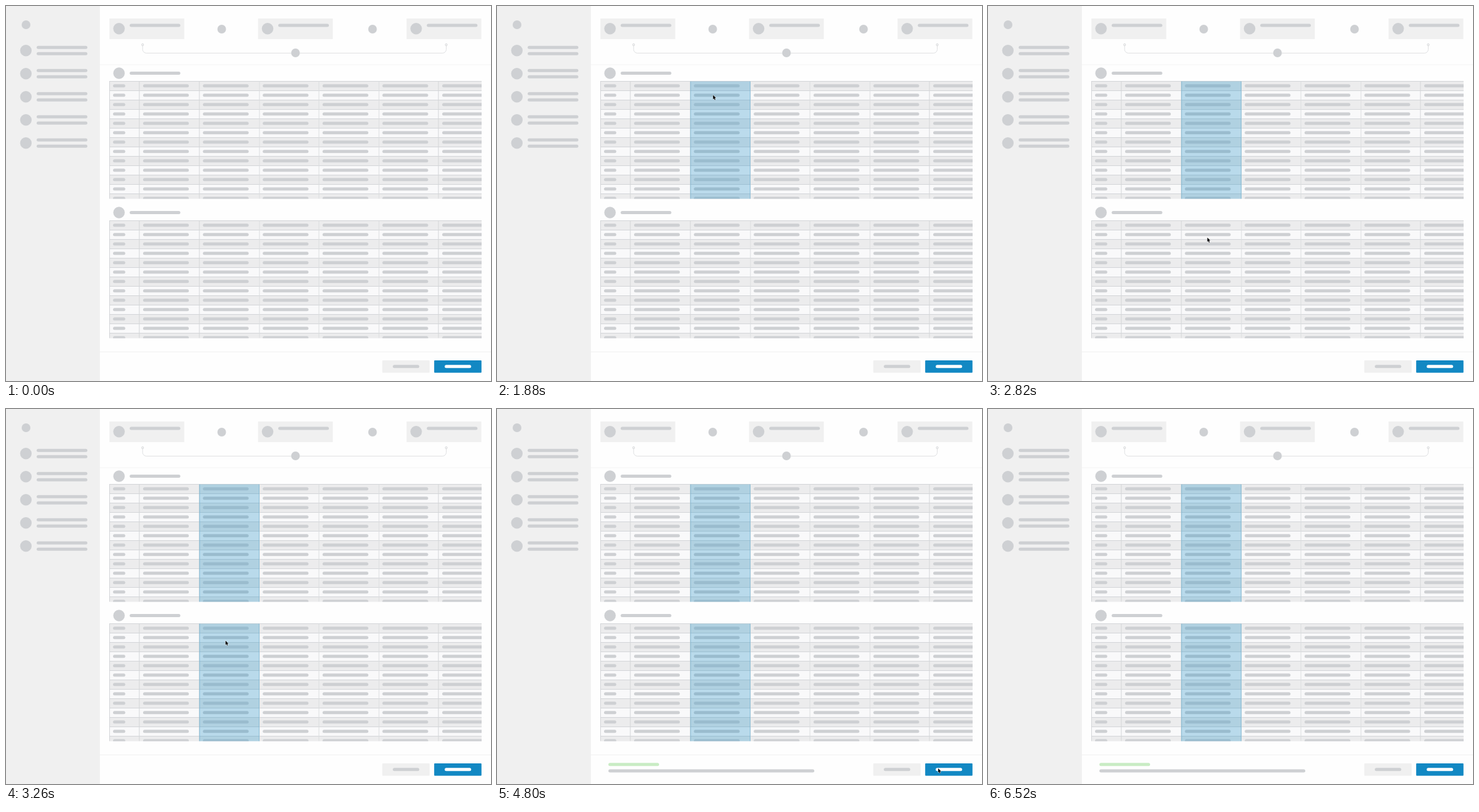
An HTML page with a canvas that plays this animation: 775x600 px, repeating every 6.54 s.

```html
<!DOCTYPE html>
<html lang="en">
<head>
<meta charset="utf-8">
<title>Column matching</title>
<style>
  html, body { margin: 0; width: 100%; height: 100%; overflow: hidden; background: #fefefe; }
  canvas { display: block; }
</style>
</head>
<body>
<canvas id="stage" width="775" height="600"></canvas>
<script>
const LOOP = 6540;
const GREY = '#ced0d3', PANEL = '#f0f0f0', LINE = '#d3d5d8', BLUE = '#1288c3';
const ctx = document.getElementById('stage').getContext('2d');

const TABLES = [120.5, 343.5];
const TABLE_HEIGHT = 188, ROW = 15, LEFT = 165, RIGHT = 760;
const COLUMN = 95.6, FIRST_COLUMN = 213.3;

const clamp = v => Math.max(0, Math.min(1, v));
const easeOut = p => 1 - (1 - p) ** 3;
const easeInOut = p => p < 0.5 ? 4 * p ** 3 : 1 - (2 - 2 * p) ** 3 / 2;
const easeIn = p => p * p;
const linear = p => p;

// Pointer stops: time, x, y, easing used to get there.
const POINTER = [
  [740, 800, 109, linear],
  [1000, 331, 152, easeOut],
  [1120, 338, 142, easeInOut],
  [1440, 345.3, 142.5, linear],
  [1980, 345.3, 142.5, linear],
  [2680, 350.5, 370.5, easeInOut],
  [3220, 350.5, 370.5, linear],
  [3920, 705, 575, easeInOut],
  [5020, 705, 575, linear],
  [5400, 800, 575, easeIn]
];

function rect(x, y, w, h, color) {
  ctx.fillStyle = color;
  ctx.fillRect(x, y, w, h);
}

function disc(x, y, r, color = GREY) {
  ctx.fillStyle = color;
  ctx.beginPath();
  ctx.arc(x, y, r, 0, Math.PI * 2);
  ctx.fill();
}

function bar(x, cy, w, color = GREY) {
  ctx.fillStyle = color;
  ctx.beginPath();
  ctx.roundRect(x, cy - 2.5, w, 5, 2.5);
  ctx.fill();
}

function button(x, color, barColor) {
  ctx.fillStyle = color;
  ctx.beginPath();
  ctx.roundRect(x, 567, 75.6, 19.8, 1);
  ctx.fill();
  bar(x + 16.8, 576.7, 42.3, barColor);
}

function drawSidebar() {
  rect(0, 0, 150, 600, PANEL);
  disc(32, 30, 7);
  for (let i = 0; i < 5; i++) {
    const y = 71.2 + i * 37;
    disc(31.8, y, 9.2);
    bar(49, y - 5, 81);
    bar(49, y + 5, 81);
  }
}

function drawHeader() {
  for (let i = 0; i < 3; i++) {
    const x = 165.3 + i * 237.4;
    rect(x, 20, 119.5, 33, PANEL);
    disc(x + 15.3, 36.3, 9.2);
    bar(x + 32.3, 31, 81);
  }
  disc(344.7, 37, 6.9);
  disc(585.7, 37, 6.9);

  ctx.strokeStyle = '#dcdddf';
  ctx.lineWidth = 0.9;
  ctx.beginPath();
  ctx.moveTo(218.3, 63.5);
  ctx.arcTo(218.3, 75.4, 230, 75.4, 6);
  ctx.arcTo(703.5, 75.4, 703.5, 63.5, 6);
  ctx.lineTo(703.5, 63.5);
  ctx.stroke();
  for (const x of [218.3, 703.5]) {
    disc(x, 62, 2, '#d2d4d6');
    disc(x, 62, 1.1, '#fefefe');
  }
  disc(462.6, 75, 6.9);
  rect(150, 93.5, 625, 1, '#f5f5f5');
}

function drawTable(top) {
  disc(180.6, top - 13, 9.2);
  bar(197.6, top - 13, 81);

  ctx.save();
  ctx.beginPath();
  ctx.rect(LEFT, top - 0.5, RIGHT - LEFT, TABLE_HEIGHT + 0.5);
  ctx.clip();
  for (let row = 0; row < 13; row++) {
    const y = top + row * ROW;
    rect(LEFT, y, RIGHT - LEFT, ROW, row % 2 ? '#f9f9fa' : '#ececed');
    rect(LEFT, y - 0.5, RIGHT - LEFT, 1, LINE);
    bar(171, y + 7.2, 19.6);
    for (let c = 0; c < 6; c++) {
      bar(FIRST_COLUMN + c * COLUMN + 5.7, y + 7.2, 73.2);
    }
  }
  rect(LEFT, top, 1, TABLE_HEIGHT, LINE);
  for (let c = 0; c < 6; c++) {
    const strong = c < 2 || c === 5;
    rect(Math.round(FIRST_COLUMN + c * COLUMN) - 0.5, top, 1, TABLE_HEIGHT, strong ? LINE : '#dcdee0');
  }
  ctx.restore();
}

function drawHighlight(top, amount) {
  if (!amount) return;
  ctx.globalAlpha = 0.28 * amount;
  rect(308.8, top, 96.2, TABLE_HEIGHT, BLUE);
  ctx.globalAlpha = 0.22 * amount;
  rect(308.8, top, 1, TABLE_HEIGHT, BLUE);
  rect(404, top, 1, TABLE_HEIGHT, BLUE);
  ctx.globalAlpha = 1;
}

function drawFooter(message) {
  rect(150, 553, 625, 1, '#f1f1f1');
  button(601.3, PANEL, GREY);
  button(684.2, BLUE, '#fff');
  ctx.globalAlpha = message;
  bar(178, 568.8, 81, '#c9ecc4');
  bar(178, 579, 329);
  ctx.globalAlpha = 1;
}

function pointerAt(t) {
  const next = POINTER.findIndex(stop => t < stop[0]);
  if (next < 1) return null;
  const [t0, x0, y0] = POINTER[next - 1];
  const [t1, x1, y1, ease] = POINTER[next];
  const p = ease((t - t0) / (t1 - t0));
  return [x0 + (x1 - x0) * p, y0 + (y1 - y0) * p];
}

function drawPointer(t) {
  const at = pointerAt(t);
  if (!at) return;
  ctx.save();
  ctx.translate(...at);
  ctx.beginPath();
  ctx.moveTo(0, 0);
  ctx.lineTo(0, 6.8);
  ctx.lineTo(1.5, 5.4);
  ctx.lineTo(2.6, 7.9);
  ctx.lineTo(3.7, 7.4);
  ctx.lineTo(2.6, 5);
  ctx.lineTo(4.7, 4.8);
  ctx.closePath();
  ctx.lineJoin = 'round';
  ctx.lineWidth = 0.8;
  ctx.strokeStyle = '#fff';
  ctx.stroke();
  ctx.fillStyle = '#000';
  ctx.fill();
  ctx.restore();
}

function draw(t) {
  const fade = (start, length) => easeOut(clamp((t - start) / length));
  rect(0, 0, 775, 600, '#fefefe');
  drawSidebar();
  drawHeader();
  TABLES.forEach(drawTable);
  drawHighlight(TABLES[0], fade(1690, 300));
  drawHighlight(TABLES[1], fade(2930, 300));
  drawFooter(fade(4170, 300));
  drawPointer(t);
}

const start = performance.now();
function tick() {
  draw((performance.now() - start) % LOOP);
  requestAnimationFrame(tick);
}
tick();
</script>
</body>
</html>
```
